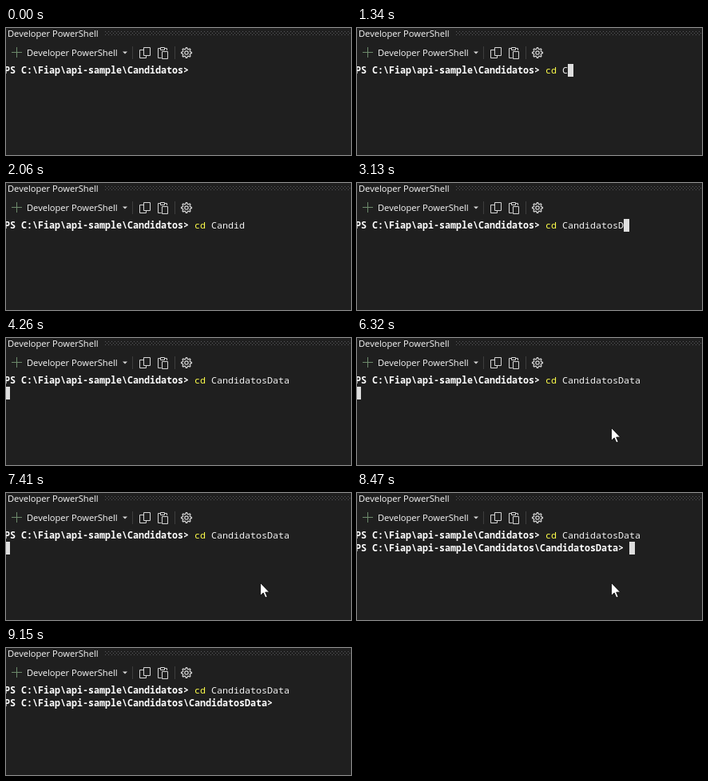
An HTML page for the animation above (9560 ms loop, 432 by 159 pixels).

```html
<!DOCTYPE html>
<html lang="en">
<head>
<meta charset="utf-8">
<title>Terminal</title>
<style>
html, body { margin: 0; width: 100%; height: 100%; overflow: hidden; background: #1f1f1f; }
svg { display: block; width: 432px; height: 159px; }
.ui { font: 11.15px "Open Sans", "Noto Sans", sans-serif; fill: #fafafa; }
.term { font: 11.667px "Noto Sans Mono", "DejaVu Sans Mono", monospace; white-space: pre; }
.prompt { fill: #fff; font-weight: 600; }
.command { fill: #ffff4a; }
.arg { fill: #f2f2f2; }
.icon { fill: none; stroke: #d6d6d6; }
</style>
</head>
<body>
<svg viewBox="0 0 432 159">
  <defs>
    <pattern id="grip" x="124" y="4" width="4" height="4" patternUnits="userSpaceOnUse">
      <path d="M0 0h1v1h-1zM2 2h1v1h-1z" fill="#58585c"/>
    </pattern>
  </defs>
  <rect width="432" height="159" fill="#1f1f1f"/>
  <text class="ui" x="2" y="11">Developer PowerShell</text>
  <rect x="124" y="4" width="308" height="5" fill="url(#grip)" shape-rendering="crispEdges"/>

  <path d="M7 30.5H20M13.5 24V37" stroke="#6d8a6b" fill="none"/>
  <text class="ui" x="26" y="35">Developer PowerShell</text>
  <path d="M146 29.5h6l-3 3z" fill="#d6d6d6"/>
  <path d="M158.5 23v16M211.5 23v16" stroke="#3d3d3d"/>
  <g class="icon">
    <path d="M172.5 24.5h8v10h-8zM172.5 27.5h-5v10h8v-3"/>
    <path d="M194.5 37.5h-4v-12H193M199 25.5h2.500V28M193.500 24.500h5v3h-5zM195.500 29.500h7v9h-7z"/>
    <path id="gear" stroke-width="1.2" stroke-linejoin="round"/>
    <circle cx="226" cy="31" r="2.2" stroke-width="1.2"/>
  </g>

  <g class="term">
    <text id="prompt1" class="prompt" y="57"></text>
    <text id="command" class="command" y="57"></text>
    <text id="arg" class="arg" y="57"></text>
    <text id="prompt2" class="prompt" y="73"></text>
  </g>
  <rect id="caret" width="7" height="16" fill="#dedede"/>
  <path id="mouse" d="M.5 .5V16.500L4.200 13L6.800 19L9.200 18L6.700 12.200H11.700Z" fill="#fff" stroke="#000" stroke-width=".8"/>
</svg>
<script>
const LOOP = 9560, CELL = 7, LEFT = -2, TOP = 45, ROW = 16;
const HOME = "PS C:\\Fiap\\api-sample\\Candidatos";
const FOLDER = "CandidatosData";
const START = HOME.length + 2;
const ENTER = 3600, DONE = 7540;
const BLINK = 531, FIRST_BLINK = 465;

// each burst is typed at an even pace
const BURSTS = [
  { text: "cd ", at: 680, gap: 195 },
  { text: "Candidatos", at: 1340, gap: 143 },
  { text: "Data", at: 3130, gap: 135 },
];
const KEYS = BURSTS.flatMap(b => [...b.text].map((char, i) => ({ char, at: b.at + i * b.gap })));

const EDGE = [414, 117], REST = [318, 112], EXIT = [373, 156];
const ARRIVE = [5790, 5990], LEAVE = [8800, 9150];

const el = id => document.getElementById(id);
const column = i => LEFT + i * CELL;
const show = (node, on) => { node.style.display = on ? "" : "none"; };
const progress = (t, [a, b]) => Math.min(1, Math.max(0, (t - a) / (b - a)));
const mix = (p, q, k) => p.map((v, i) => v + (q[i] - v) * k);

function put(id, text, col) {
  const node = el(id);
  if (node.textContent === text) return;
  node.setAttribute("x", [...text].map((_, i) => column(col + i)).join(" "));
  node.textContent = text;
}

// The blink timer toggles the caret; a key press lights it again.
function caretLit(t) {
  const presses = [...KEYS.map(k => k.at), ENTER].filter(at => at <= t);
  const last = presses.length ? presses[presses.length - 1] : 0;
  const ticks = time => Math.max(0, Math.floor((time - FIRST_BLINK) / BLINK) + 1);
  const toggles = ticks(t) - ticks(last);
  return (toggles % 2 === 0) === presses.length > 0;
}

function mouseAt(t) {
  if (t < LEAVE[0]) return mix(EDGE, REST, 1 - (1 - progress(t, ARRIVE)) ** 2);
  return mix(REST, EXIT, progress(t, LEAVE) ** 1.4);
}

function gearPath() {
  const pts = [];
  for (let i = 0; i < 32; i++) {
    const a = (i + 0.5) * Math.PI / 16;
    const r = (i + 1) % 4 < 2 ? 6.5 : 4.7;
    pts.push((226 + r * Math.cos(a)).toFixed(2) + " " + (31 + r * Math.sin(a)).toFixed(2));
  }
  return "M" + pts.join("L") + "Z";
}

function render(t) {
  const line = KEYS.filter(k => k.at <= t).map(k => k.char).join("");
  put("command", line.slice(0, 2), START);
  put("arg", line.slice(3), START + 3);

  const second = t >= DONE ? `${HOME}\\${FOLDER}>` : "";
  put("prompt2", second, 0);

  const row = t >= ENTER ? 1 : 0;
  const col = row ? (second ? second.length + 1 : 0) : START + line.length;
  const caret = el("caret");
  caret.setAttribute("x", column(col));
  caret.setAttribute("y", TOP + row * ROW);
  show(caret, caretLit(t));

  const mouse = el("mouse");
  mouse.setAttribute("transform", `translate(${mouseAt(t).map(Math.round).join(" ")})`);
  show(mouse, t >= ARRIVE[0] && t < LEAVE[1]);
}

el("gear").setAttribute("d", gearPath());
put("prompt1", HOME + ">", 0);

const begin = performance.now();
function tick() {
  render((performance.now() - begin) % LOOP);
  requestAnimationFrame(tick);
}
render(0);
requestAnimationFrame(tick);
</script>
</body>
</html>
```
